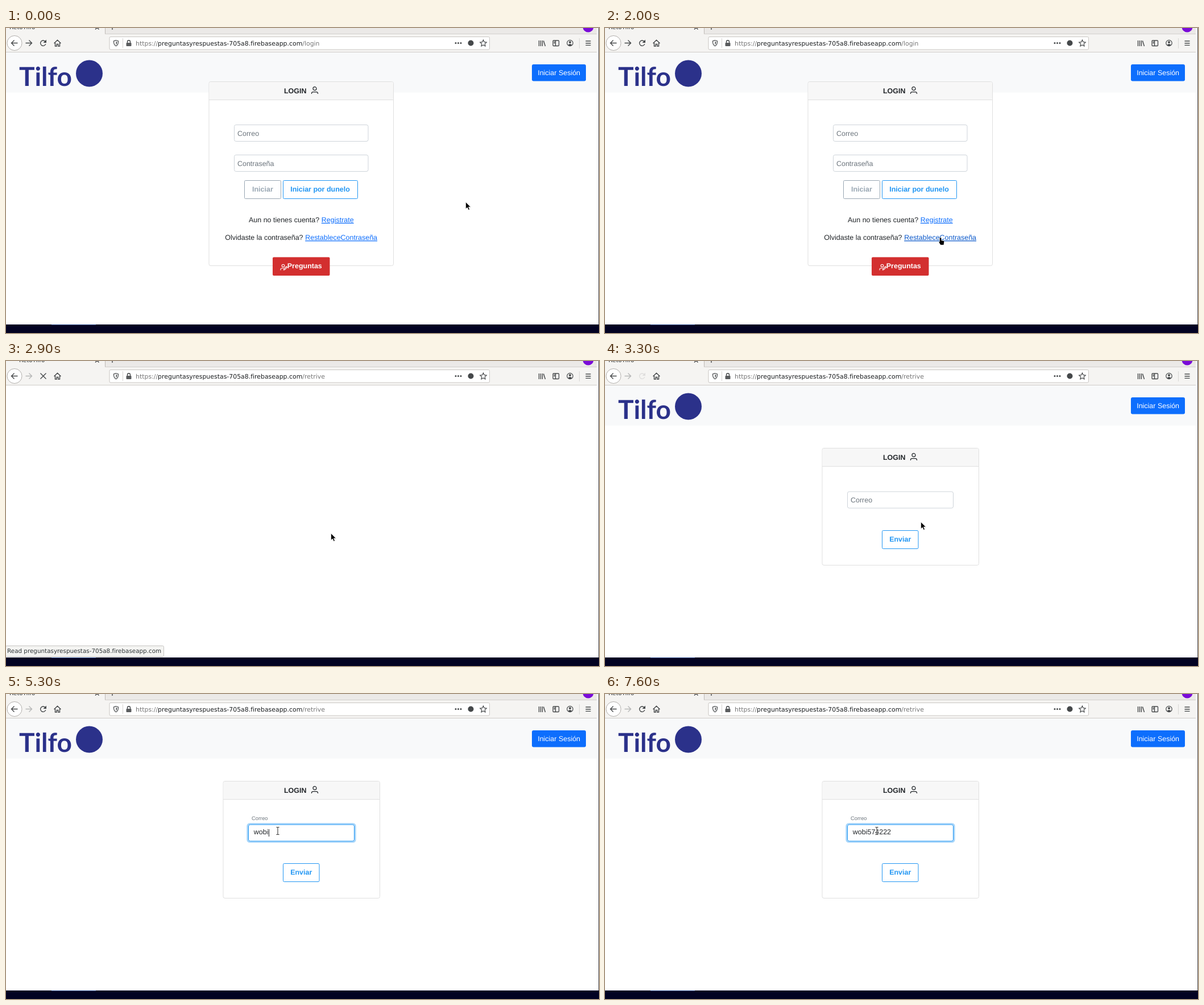
These frames come from a looping animation (1043 by 537 pixels, 8 s). An HTML page:

```html
<!DOCTYPE html>
<html lang="es">
<head>
<meta charset="utf-8">
<title>Login</title>
<style>
  html, body { margin: 0; width: 100%; height: 100%; overflow: hidden; background: #fff; }
  svg { display: block; width: 100vw; height: 100vh; }
  text { font-family: "Liberation Sans", Arial, sans-serif; font-size: 12.48px; fill: #212529;
         text-rendering: geometricPrecision; white-space: pre; }
  .ui { font-family: "DejaVu Sans", sans-serif; font-size: 10.38px; fill: #2e3436; }
  .url { font-size: 10.92px; fill: #777; }
  .bold { font-weight: bold; }
  .hint { fill: #6c757d; }
  .link { fill: #0d6efd; text-decoration: underline; }
  .icon { fill: none; stroke: #45484a; stroke-width: 1.4; }
  .thin { stroke-width: 1.2; }
</style>
</head>
<body>
<svg id="stage" viewBox="0 0 1043 537" xmlns="http://www.w3.org/2000/svg"></svg>
<script>
const LOOP = 8000, STEP = 100;
const URL_AT = 2200, STATUS_AT = 2300, BLANK_AT = 2900, LOADED_AT = 3100, RELOAD_AT = 3700, FOCUS_AT = 4000;
const HOST = 'preguntasyrespuestas-705a8.firebaseapp.com';
const EMAIL = 'wobi574222';
const KEYS = [4700, 5000, 5200, 5300, 5500, 5800, 6200, 6800, 7100, 7300];
const CARET_OFF = [[6400, 6800], [7600, 8000]];
const BLUE = '#2196f3', NAVY = '#2b318a', INK = '#45484a';

// time, x, y of the pointer's hot spot
const PATH = [
  [0, 809, 307], [100, 809, 307], [400, 661, 332], [700, 661, 332], [1200, 632, 354],
  [1600, 606, 347], [2000, 590, 369], [2800, 590, 369], [2900, 572, 304],
  [3300, 556, 284], [3700, 500, 251], [4100, 478, 241], [8000, 478, 241]
];

const text = (x, y, str, cls = '', extra = '') =>
  `<text x="${x}" y="${y}" class="${cls}" ${extra}>${str}</text>`;
const rect = (x, y, w, h, fill, stroke = 'none', r = 0, extra = '') =>
  `<rect x="${x}" y="${y}" width="${w}" height="${h}" rx="${r}" fill="${fill}" stroke="${stroke}" ${extra}/>`;
const icon = (d, cls = '', extra = '') => `<path class="icon ${cls}" d="${d}" ${extra}/>`;
const dot = (x, y, r, fill) => `<circle cx="${x}" cy="${y}" r="${r}" fill="${fill}"/>`;
const group = (id, body) => `<g id="${id}">${body}</g>`;

const outlined = (x, y, w, label, tx, color) =>
  rect(x, y, w, 32, '#fff', color, 2) + text(tx, y + 19.6, label, 'bold', `style="fill:${color}"`);

const field = (x, y, w, extra) => rect(x, y, w, 29, '#fff', '#ced4da', 3, extra);

const card = (x, y, w, h) =>
  rect(x, y, w, h, '#fff', '#dfdfdf', 3) +
  rect(x + .5, y + .5, w - 1, 31, '#f7f7f7', 'none', 2.5) +
  rect(x, y + 31.5, w, 1, '#dfdfdf') +
  text(489, y + 20.4, 'LOGIN', 'bold') +
  `<g transform="translate(543 ${y})" fill="none" stroke="#212529" stroke-width="1.2">
     <circle cy="12.2" r="3"/><path d="M-5.5 21.600v-1.200q0-2.300 2.600-2.300h5.800q2.600 0 2.600 2.300v1.200"/></g>`;

const chrome =
  rect(0, 0, 1043, 42, '#f5f4f2') +
  rect(174, 0, 866, 10, '#ebe9e7') +
  rect(174, 0, 1, 11, '#bdbab6') + rect(174, 10, 866, 1, '#d3d0cd') +
  rect(0, 42, 1040, 1, '#cfccc9') +
  text(6, 2.4, 'RetoTilfo', 'ui', 'id="tab"') +
  icon('M157-4l6.5 6.5M163.500-4l-6.500 6.500M187-5v8M183-1h8') +
  dot(1024, -2, 9.5, '#7a0bd8') +
  '<circle cx="15" cy="26.500" r="13" fill="#fff" stroke="#b1aeab"/>' +
  icon('M20.500 26.500h-11M14.500 21.500l-5 5 5 5') +
  icon('M34.500 26.500h11M40.500 21.500l5 5-5 5', '', 'id="forward"') +
  group('reload', icon('M69.500 24.500a4.700 4.700 0 1 0 .3 3.600') +
    `<path d="M71 20.500v5.500h-5.500z" fill="${INK}"/>`) +
  icon('M60.500 21.500l10 10M70.500 21.500l-10 10', '', 'id="stop"') +
  icon('M84.500 27l6-5.800 6 5.800M86.500 26v6h2.700v-3.500h2.600v3.500h2.700v-6') +
  rect(182, 15.5, 668.5, 22.5, '#fff', '#c9c6c3', 2) +
  icon('M193.500 21.700l4 1.200c.2 4-.8 7.200-4 8.800-3.200-1.600-4.200-4.800-4-8.800z', 'thin') +
  `<path d="M193.500 24v5.400c1.400-1.200 1.900-2.700 1.800-4.900z" fill="${INK}"/>` +
  rect(205, 18, 1, 17, '#d4d2d0') +
  rect(211.5, 26, 9, 6, '#5a5c5e', 'none', 1) +
  icon('M213.500 26.500v-2.200a2.500 2.500 0 0 1 5 0v2.200') +
  text(228, 30.7, `https://<tspan fill="#1c1f21">${HOST}</tspan><tspan id="route">/login</tspan>`, 'ui url') +
  [791, 795.5, 800].map(x => dot(x, 26.5, 1.5, INK)).join('') +
  dot(817.5, 26.5, 5, INK) +
  icon('M839.500 21l1.700 3.700 4 .5-3 2.700.8 4-3.500-2-3.500 2 .8-4-3-2.700 4-.5z', 'thin') +
  icon('M937.500 22v10M940.500 22v10M943.500 22v10M945.500 22.500l3 9.500') +
  rect(962, 22, 10.5, 9.5, 'none', INK, 1.2, 'stroke-width="1.3"') +
  icon('M966.500 22v9.500M963.500 24.500h2M963.500 26.500h2') +
  '<circle cx="992" cy="26.500" r="5.200" class="icon thin"/>' +
  dot(992, 25, 2, INK) + `<path d="M988.500 30q3.500-4 7 0-3.500 2.600-7 0z" fill="${INK}"/>` +
  rect(1008, 18, 1, 18, '#d9d7d5') +
  icon('M1019.500 23h9M1019.500 26.700h9M1019.500 30.400h9');

const banner =
  rect(0, 43, 1039, 70.5, '#f8f9fa') +
  text(23, 102, 'Tilfo', '', `style="font:bold 46px Lato,sans-serif;fill:${NAVY}"`) +
  dot(146.5, 80, 23.5, NAVY) +
  rect(925, 64, 95, 29.5, '#0d6efd', 'none', 3) +
  text(935.2, 82.6, 'Iniciar Sesión', '', 'style="fill:#fff"');

const login =
  card(357, 94.5, 324.5, 324) +
  field(401.5, 170.5, 235.5) + text(407, 189.5, 'Correo', 'hint') +
  field(401.5, 223.5, 235.5) + text(407, 242.6, 'Contraseña', 'hint') +
  outlined(419.5, 268.5, 64, 'Iniciar', 433, '#98a6b2') +
  outlined(487.5, 268.5, 131, 'Iniciar por dunelo', 500.2, BLUE) +
  text(427, 342, 'Aun no tienes cuenta?') + text(554.8, 342, 'Registrate', 'link') +
  text(385.3, 373.2, 'Olvidaste la contraseña?') +
  text(526.2, 373.2, 'RestableceContraseña', 'link', 'id="reset"') +
  rect(469, 403.5, 100.5, 32.5, '#d32f2f', 'none', 2) +
  `<g fill="none" stroke="#fff" stroke-width="1.100"><circle cx="487.500" cy="418.500" r="2.300"/>
   <path d="M483 426.500v-1.500q0-2 2.200-2h3.300M488.500 426l.5-2 4.200-4.200 1.400 1.400-4.200 4.200z"/></g>` +
  text(494.8, 422.7, 'Preguntas', 'bold', 'style="fill:#fff"');

const recover =
  card(382, 153.5, 275.5, 206) +
  rect(424.7, 228.5, 189.6, 32, 'none', '#a6d5fa', 4, 'id="glow" stroke-width="2.6"') +
  field(426.5, 230, 186, 'id="box"') +
  text(432, 249, 'Correo', 'hint', 'id="label"') +
  text(435.8, 247.4, EMAIL, '', 'id="typed"') +
  rect(436, 238, 1, 13, '#212529', 'none', 0, 'id="caret"') +
  outlined(487.5, 298.5, 63.5, 'Enviar', 500.2, BLUE);

const BEAM = 'M-2.500-6.500h1.700q.8 0 .8.800v11.400q0 .8-.8.800h-1.700M2.500-6.500h-1.700q-.8 0-.8.800M2.500 6.500h-1.700q-.8 0-.8-.8';
const pointer =
  '<path id="arrow" d="M-.4-.6v12.200l2.800-2.600 2 4.400 2.100-.9-2-4.300h3.900z" fill="#000" stroke="#fff" stroke-width=".7"/>' +
  '<path id="hand" d="M-.8 0h1.600q.8 0 .8.800v4l4 .9q1.200.3 1 1.600l-.8 5.700h-5.600l-3-4.700q-.5-1.300.8-1.400l.600.500v-6.600q0-.8.600-.8z" fill="#000" stroke="#fff" stroke-width=".5"/>' +
  `<g id="beam" fill="none"><path d="${BEAM}" stroke="#fff" stroke-width="2"/><path d="${BEAM}" stroke="#222"/></g>`;

document.getElementById('stage').innerHTML =
  rect(0, 0, 1043, 537, '#fff') + chrome +
  group('banner', banner) + group('login', login) + group('recover', recover) +
  group('status', rect(-.5, 501.5, 278, 19, '#f4f4f2', '#c6c4c2', 2) + text(2, 513.7, 'Read ' + HOST, 'ui')) +
  rect(1039, 0, 3, 522, '#fbfbfb') + rect(1042, 0, 1, 522, '#55565c') +
  rect(0, 522, 1043, 15, '#020222') + rect(80, 522, 78, 1, '#294a8e') +
  group('pointer', pointer);

const el = Object.fromEntries([...document.querySelectorAll('[id]')].map(n => [n.id, n]));
const show = (node, on) => { node.style.display = on ? '' : 'none'; };
const inside = (p, x, y, w, h) => p.x >= x && p.x <= x + w && p.y >= y && p.y <= y + h;
const mix = (a, b, k) => a + (b - a) * k;

function pointerAt(t) {
  const i = Math.max(1, PATH.findIndex(p => p[0] >= t));
  const [t0, x0, y0] = PATH[i - 1], [t1, x1, y1] = PATH[i];
  const k = (t - t0) / (t1 - t0);
  return { x: Math.round(mix(x0, x1, k)), y: Math.round(mix(y0, y1, k)) };
}

function draw(now) {
  const t = Math.floor(now % LOOP / STEP) * STEP;
  const onLogin = t < BLANK_AT, loaded = t >= LOADED_AT;
  const loading = t >= URL_AT && !loaded;

  show(el.banner, onLogin || loaded);
  show(el.login, onLogin);
  show(el.recover, loaded);
  show(el.status, t >= STATUS_AT && !loaded);
  show(el.stop, loading);
  show(el.reload, !loading);
  el.reload.style.opacity = loaded && t < RELOAD_AT ? .12 : 1;
  el.forward.style.opacity = t < URL_AT ? 1 : .35;
  el.tab.setAttribute('x', loading ? 23 : 6);
  el.route.textContent = t < URL_AT ? '/login' : '/retrive';

  const p = pointerAt(t);
  const hand = onLogin && inside(p, 526, 362, 127, 15);
  const beam = loaded && inside(p, 426, 230, 187, 29);
  el.pointer.setAttribute('transform', `translate(${p.x} ${p.y})`);
  show(el.hand, hand);
  show(el.beam, beam);
  show(el.arrow, !hand && !beam);
  el.reset.style.fill = hand ? '#0a58ca' : '';

  // the label floats up while the focus ring fades in
  const k = Math.min(1, Math.max(0, (t - FOCUS_AT) / 200));
  el.label.setAttribute('y', mix(249, 221.6, k));
  el.label.style.fontSize = mix(12.48, 9.36, k) + 'px';
  el.glow.style.opacity = k;
  el.box.setAttribute('stroke', k > 0 ? BLUE : '#ced4da');

  const count = KEYS.filter(key => key <= t).length;
  el.typed.textContent = EMAIL.slice(0, count);
  const focused = t > FOCUS_AT;
  show(el.caret, focused && !CARET_OFF.some(([a, b]) => t >= a && t < b));
  if (focused) el.caret.setAttribute('x', Math.round(436 + (count ? el.typed.getComputedTextLength() : 0)));
}

const start = performance.now();
function tick() {
  draw(performance.now() - start);
  requestAnimationFrame(tick);
}
tick();
</script>
</body>
</html>
```
